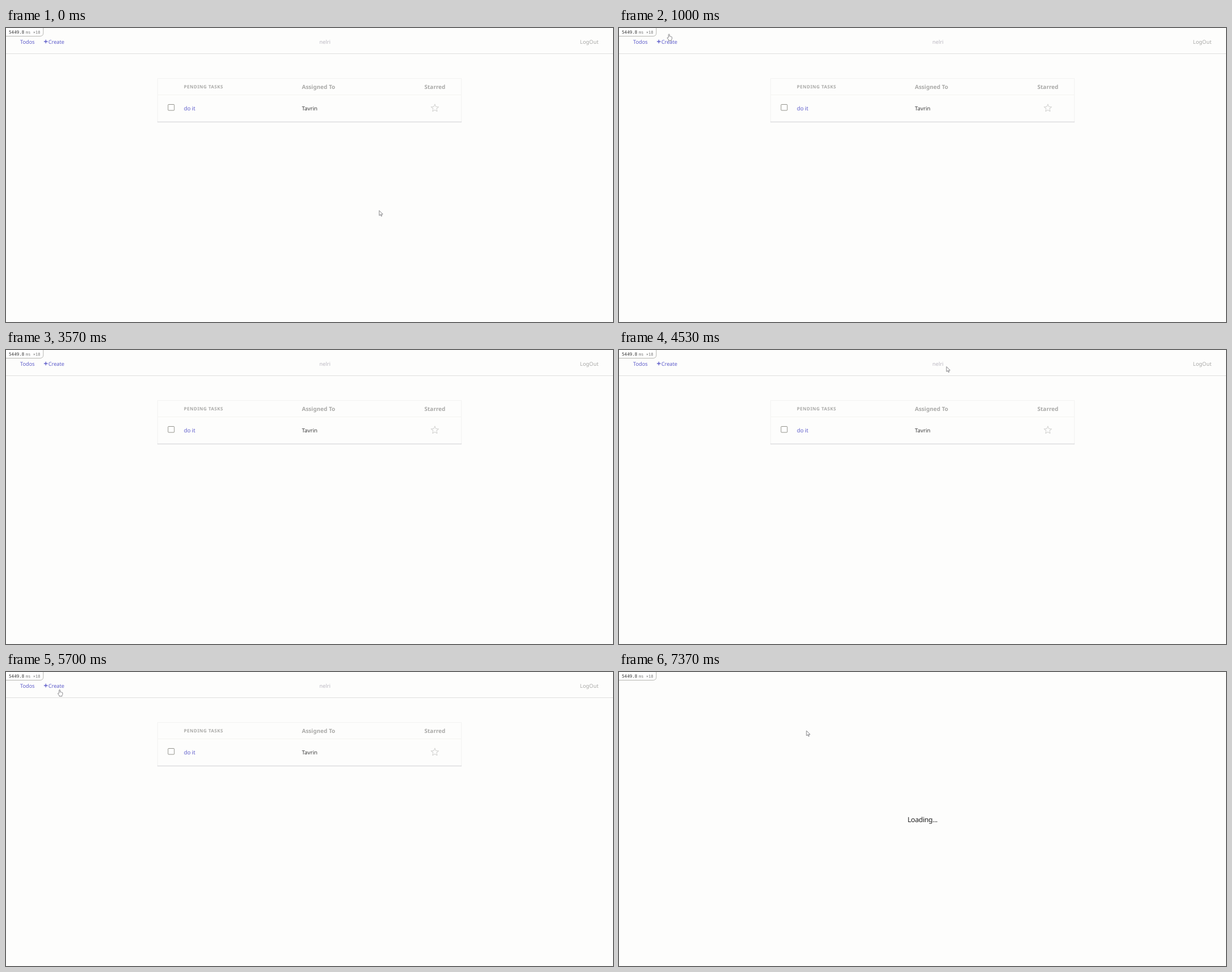
An HTML page for the animation above (8 s loop, 1075 by 521 pixels).

```html
<!DOCTYPE html>
<html lang="en">
<head>
<meta charset="utf-8">
<title>Todo list</title>
<style>
  html, body { margin: 0; width: 100%; height: 100%; overflow: hidden; background: #fdfdfc; }
  svg { display: block; width: 1075px; height: 521px; font: 9.4px "Noto Sans", sans-serif; text-rendering: geometricPrecision; }
  .link { fill: #6261cc; font-weight: 500; letter-spacing: -.1px; }
  .head { fill: #a9a9a7; font-weight: 700; font-size: 10px; }
  .caps { font-size: 8px; letter-spacing: .5px; }
  .mono { font-family: "DejaVu Sans Mono", monospace; font-size: 7px; fill: #777; }
  .cursor { fill: #fff; stroke: #77777a; stroke-width: .9; stroke-linejoin: round; }
</style>
</head>
<body>
<svg viewBox="0 0 1075 521">
  <g id="page">
    <path d="M0 45.5H1075" stroke="#dfdfde"/>
    <text class="link" x="25" y="28">Todos</text>
    <path d="M67.3 24H73.7M70.5 20.8V27.2" stroke="#5c5bc8" stroke-width="1.3"/>
    <text class="link" x="75" y="28">Create</text>
    <text x="555" y="27.5" fill="#bcb8c2">nelri</text>
    <text x="1016.5" y="27.5" fill="#aaaaa8" font-weight="500">LogOut</text>

    <rect x="268.5" y="89.5" width="538" height="77" fill="none" stroke="#f3f3f2"/>
    <path d="M269 118.5H806" stroke="#f3f3f1"/>
    <path d="M268 166.5H807" stroke="#dcdcde" stroke-width="1.3"/>
    <text class="head caps" x="315" y="107">PENDING TASKS</text>
    <text class="head" x="524" y="107.5">Assigned To</text>
    <text class="head" x="741" y="107.5">Starred</text>
    <rect x="287" y="135.5" width="11" height="10.5" rx="1" fill="#fff" stroke="#92928a"/>
    <text class="link" x="315" y="146" font-size="9.9">do it</text>
    <text x="524" y="146" font-size="9.7" font-weight="500" fill="#3c3c3c">Tavrin</text>
    <path id="star" fill="none" stroke="#d6d6d4" stroke-width="1.1" stroke-linejoin="round"/>
  </g>
  <text id="loading" x="511" y="265.5" font-size="12.3" letter-spacing="-.35" fill="#222">Loading...</text>

  <path d="M-1-1H66V9Q66 14.5 60 14.5H-1Z" fill="#fff" stroke="#b4b4b0"/>
  <g class="mono">
    <text x="5" y="10.3" style="font-size:7.6px" fill="#333">5449.8</text>
    <text x="35" y="10.3">ms</text>
    <text x="48" y="10.3">×18</text>
  </g>

  <g id="cursor" class="cursor">
    <path id="arrow" d="M0 .5V9.4L2.1 7.5 3.5 10.6 4.9 10 3.6 7H6.4Z"/>
    <path id="hand" d="M-1 6.5V1.2Q0-.2 1 1.2V4.6Q2 3.9 2.6 4.9Q3.6 4.3 4 5.3Q5.2 5 5.2 6.2V8.6Q5 10 4.1 10.6V12H-.7V10.8L-3.2 7.4Q-3 6-1.7 6.8Z"/>
  </g>
</svg>
<script>
const LOOP = 8000, TICK = 200 / 3, LOADED = 6130, POINTER_RESET = 6670;
const el = id => document.getElementById(id);
const show = (id, on) => el(id).setAttribute("visibility", on ? "visible" : "hidden");

const linear = u => u;
const easeIn = u => u * u;
const easeOut = u => 1 - (1 - u) ** 3;

// The pointer rests between strokes; each stroke advances once per tick
const home = { x: 661, y: 323 };
const strokes = [
  { start: 30, end: 170, x: 653, y: 322, ease: linear },
  { start: 430, end: 530, x: 90, y: -20, ease: linear },
  { start: 900, end: 1230, x: 88, y: 23, ease: easeOut },
  { start: 2800, end: 3330, x: 506, y: 54, ease: easeIn },
  { start: 4070, end: 4530, x: 580, y: 29, ease: easeOut },
  { start: 4700, end: 4970, x: 225, y: 99, ease: linear },
  { start: 5170, end: 5700, x: 95, y: 31, ease: easeOut },
  { start: 6870, end: 7000, x: 291, y: 93, ease: linear },
  { start: 7300, end: 7370, x: 332, y: 103.5, ease: linear }
];

function cursorAt(t) {
  let { x, y } = home;
  for (const s of strokes) {
    if (t < s.start) break;
    const ticks = Math.round((s.end - s.start) / TICK);
    const tick = t >= s.end ? ticks : Math.floor((t - s.start) / TICK);
    const u = s.ease((tick + 1) / (ticks + 1));
    x += (s.x - x) * u;
    y += (s.y - y) * u;
  }
  return { x, y };
}

function starPath(cx, cy, outer, inner) {
  const points = Array.from({ length: 10 }, (_, i) => {
    const r = i % 2 ? inner : outer, a = (i / 5 - .5) * Math.PI;
    return [cx + r * Math.cos(a), cy + r * Math.sin(a)];
  });
  return "M" + points.join("L") + "Z";
}
el("star").setAttribute("d", starPath(759.5, 142, 7, 3.2));

function draw() {
  const t = performance.now() % LOOP, { x, y } = cursorAt(t);
  const onLink = x < 106 && y < 40 && t < POINTER_RESET;
  const hidden = t >= 3570 && t < 4070;
  show("page", t < LOADED);
  show("loading", t >= LOADED);
  show("arrow", !hidden && !onLink);
  show("hand", !hidden && onLink);
  el("cursor").setAttribute("transform", `translate(${x} ${y})`);
  requestAnimationFrame(draw);
}
draw();
</script>
</body>
</html>
```
